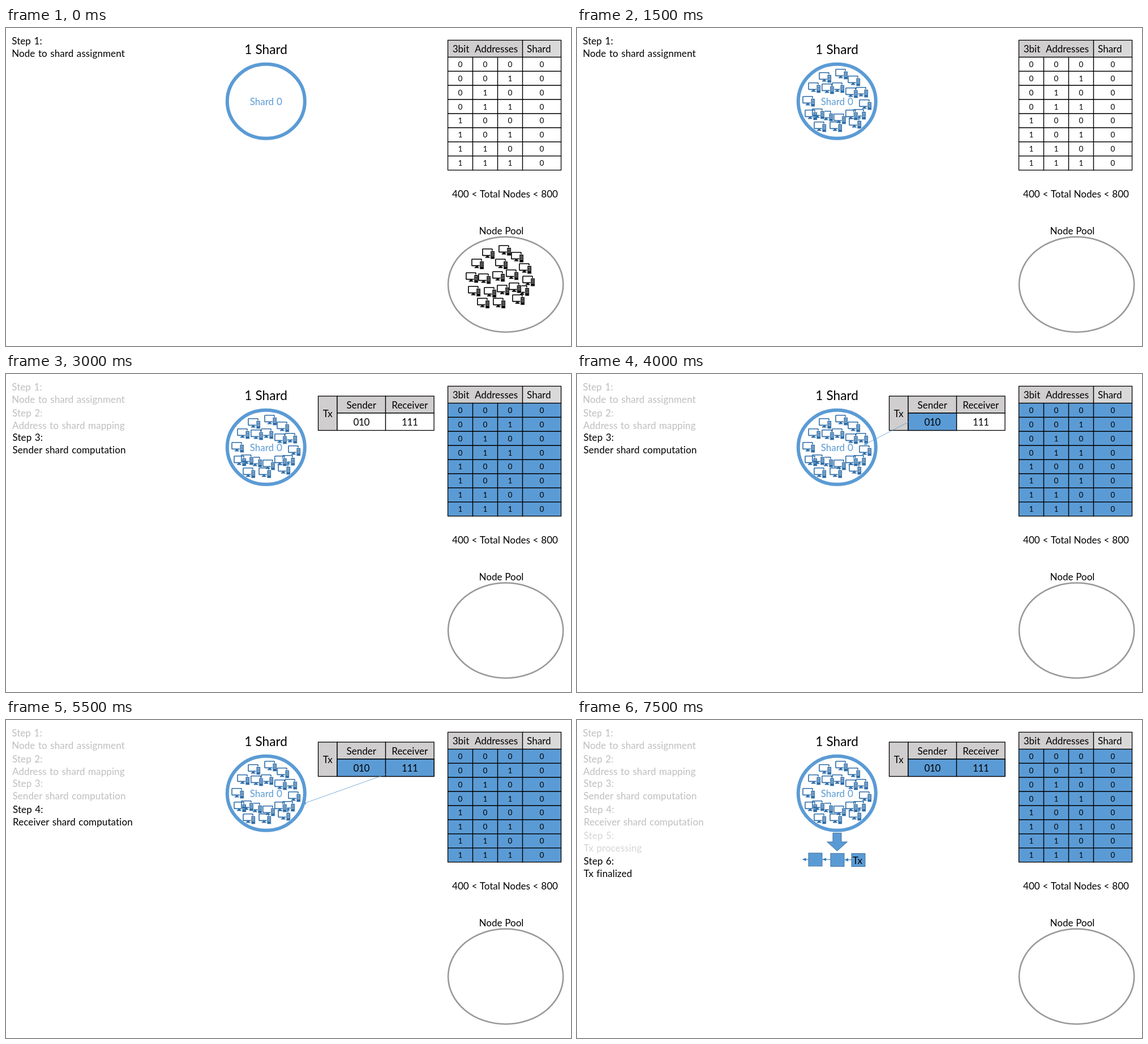
An HTML page that plays this animation: 998 px wide and 561 px high, repeating every 8 s.

```html
<!DOCTYPE html>
<html>
<head>
<meta charset="utf-8">
<title>Shard steps</title>
<style>
  html, body { margin: 0; width: 100%; height: 100%; overflow: hidden; background: #fff; }
  svg { display: block; width: 998px; height: 561px; }
  text { font: 17px Lato, sans-serif; word-spacing: 1px; letter-spacing: .1px; }
  .mid { text-anchor: middle; letter-spacing: 0; word-spacing: .5px; }
  .big { font-size: 22.6px; }
  .digit { font-size: 13.5px; }
  .num { letter-spacing: -.4px; }
  .cell { stroke: #000; stroke-width: 1.3; }
  .arrow { stroke: #5b9bd5; stroke-width: .8; marker-end: url(#head); }
  .link { stroke: #2e75b6; stroke-width: 1; marker-end: url(#linkHead); }
  .block { fill: #5b9bd5; stroke: #41719c; }
</style>
</head>
<body>
<svg id="stage" viewBox="0 0 998 561"></svg>
<script>
const LOOP = 8000, BLUE = '#5b9bd5', GREY = '#d0cece';

const text = (x, y, s, cls = '', fill = '#000') =>
  `<text x="${x}" y="${y}" class="${cls}" fill="${fill}">${s}</text>`;
const mid = (x, y, s, cls = '', fill) => text(x, y, s, 'mid ' + cls, fill);
const cell = (x1, y1, x2, y2, fill) =>
  `<rect class="cell" x="${x1}" y="${y1}" width="${x2 - x1}" height="${y2 - y1}" fill="${fill}"/>`;
const line = (cls, x1, y1, x2, y2) =>
  `<line class="${cls}" x1="${x1}" y1="${y1}" x2="${x2}" y2="${y2}"/>`;
const block = (x, y) => `<rect class="block" x="${x}" y="${y}" width="24" height="23"/>`;
const ring = (x, y, rx, ry, color, w) =>
  `<ellipse cx="${x}" cy="${y}" rx="${rx}" ry="${ry}" fill="none" stroke="${color}" stroke-width="${w}"/>`;
// Shown from one time up to another
const during = (from, to, ...parts) =>
  `<g data-from="${from}" data-to="${to}">${parts.join('')}</g>`;
const marker = (id, color) =>
  `<marker id="${id}" markerUnits="userSpaceOnUse" markerWidth="7" markerHeight="6" refX="6" refY="3" orient="auto">
    <path d="M0 .2L6.5 3L0 5.8Z" fill="${color}"/></marker>`;

const computer = `<g id="pc">
  <rect x=".8" y=".8" width="17" height="11.6" rx=".6" fill="none" stroke="currentColor" stroke-width="1.6"/>
  <path d="M7.5 12.5h4v2.3h1.8v1.6h-7.6v-1.6h1.8z" fill="currentColor"/>
  <rect x="14.8" y="4.4" width="7.4" height="14.4" rx=".6" fill="currentColor" stroke="#fff" stroke-width=".8"/>
  <path d="M16.3 7.4h4.4M16.3 10.2h4.4M16.3 13h4.4" stroke="#fff" stroke-width=".9"/>
</g>`;

// Places in the pool; the last five settle elsewhere in the shard
const pool = [
  [841, 389], [870, 383], [892, 395], [822, 407], [864, 407], [906, 415], [812, 431],
  [912, 437], [816, 455], [844, 457], [902, 454], [832, 476], [860, 476], [894, 470],
  [834, 433], [859, 429], [883, 426], [867, 453], [888, 449]];
const settled = [[415, 142], [432, 98], [474, 105], [453, 151], [474, 144]];
const shard = pool.map(([x, y], i) => settled[i - 14] || [x - 413.8, y - 311]);
const nodes = (places, color) =>
  `<g color="${color}">${places.map(([x, y]) => `<use href="#pc" x="${x}" y="${y}"/>`).join('')}</g>`;

// Address table
const cols = [780.5, 824.5, 868.5, 912.5, 980.5];
const rowY = r => 51.5 + r * 24.9;
function rows(fill) {
  let out = '';
  for (let r = 0; r < 8; r++)
    for (let c = 0; c < 4; c++) {
      const value = c < 3 ? r >> (2 - c) & 1 : 0;
      out += cell(cols[c], rowY(r), cols[c + 1], rowY(r + 1), fill)
        + mid((cols[c] + cols[c + 1]) / 2, rowY(r) + 17.3, value, 'digit');
    }
  return out;
}

// x, two baselines, start time, words, colour once past
const steps = [
  [10.2, 28.5, 51, 0, 'Node to shard assignment', '#bfbfbf'],
  [11, 74.5, 96.5, 2000, 'Address to shard mapping', '#bfbfbf'],
  [11.5, 117.8, 140, 2500, 'Sender shard computation', '#bfbfbf'],
  [12, 164, 186.2, 4500, 'Receiver shard computation', '#bfbfbf'],
  [11.8, 210, 232.3, 6000, 'Tx processing', '#d6d6d6'],
  [11.8, 254.8, 277, 7500, 'Tx finalized', '#000']];
const stepText = steps.map(([x, y1, y2, start, words, past], i) => {
  const next = i < 5 ? steps[i + 1][3] : LOOP;
  const lines = fill => text(x, y1, `Step ${i + 1}:`, '', fill) + text(x, y2, words, '', fill);
  return during(start, next, lines('#000')) + during(next, LOOP, lines(past));
}).join('');

const mapping = [
  [64, 509, 83], [93.5, 518, 96], [113, 528, 104.5], [138, 527, 112.5],
  [165, 527, 119], [189, 528, 129.5], [213.5, 526, 144], [239, 524, 151.5]
].map(([from, x, y]) => line('arrow', 781, from, x, y));

const txTable = [
  cell(551.5, 39, 585, 99.5, GREY), cell(585, 39, 670.5, 69, GREY), cell(670.5, 39, 756, 69, GREY),
  cell(585, 69, 670.5, 99.5, '#fff'), cell(670.5, 69, 756, 99.5, '#fff'),
  during(4000, LOOP, cell(585, 69, 670.5, 99.5, BLUE)),
  during(5500, LOOP, cell(670.5, 69, 756, 99.5, BLUE)),
  mid(568.3, 76, 'Tx'), mid(627.7, 61, 'Sender'), mid(713.2, 61, 'Receiver'),
  mid(627.7, 91, '010', 'num'), mid(713.2, 91, '111', 'num')];

const stage = document.getElementById('stage');
stage.innerHTML = [
  `<defs>${marker('head', BLUE)}${marker('linkHead', '#2e75b6')}${computer}</defs>`,
  stepText,
  mid(459, 45.5, '1 Shard', 'big'),
  ring(459.3, 129.3, 68.5, 65.5, BLUE, 6),
  mid(459.2, 135.7, 'Shard 0', '', BLUE),
  ring(882.6, 452.5, 101.6, 84, '#999', 2.6),
  mid(875, 363.7, 'Node Pool'),
  mid(881.5, 298.7, '400 &lt; Total Nodes &lt; 800'),
  cell(780.5, 21.5, 912.5, 51.5, GREY), cell(912.5, 21.5, 980.5, 51.5, '#d9d9d9'),
  mid(803.5, 43.2, '3bit'), mid(866, 43.2, 'Addresses'), mid(941.3, 43.2, 'Shard'),
  during(0, 2000, rows('#fff')), during(2000, LOOP, rows(BLUE)),
  during(0, 1500, nodes(pool, '#000')), during(1500, LOOP, nodes(shard, '#2e6da8')),
  during(1000, 1500, line('arrow', 793, 389, 534, 181)),
  during(2000, 2500, ...mapping),
  during(3000, LOOP, ...txTable),
  during(3500, 4500, line('arrow', 591, 82, 507, 125)),
  during(5000, 6000, line('arrow', 690, 89, 524, 148)),
  during(6500, LOOP, block(409, 234.8), block(448, 235.3),
    line('link', 409, 246, 398.5, 246), line('link', 448, 246, 434, 246)),
  during(7000, LOOP, block(485, 235.5), line('link', 485, 246.6, 473, 246.6),
    '<path class="block" d="M452 199.5h15v15.5h10.5L459.5 231L441.8 215h10.2z"/>'),
  during(7500, LOOP, mid(495.5, 254.3, 'Tx'))
].join('');

const timed = [...stage.querySelectorAll('[data-from]')];
function draw(now) {
  const t = now % LOOP;
  for (const g of timed)
    g.style.display = t >= +g.dataset.from && t < +g.dataset.to ? '' : 'none';
  requestAnimationFrame(draw);
}
draw(0);
</script>
</body>
</html>
```
